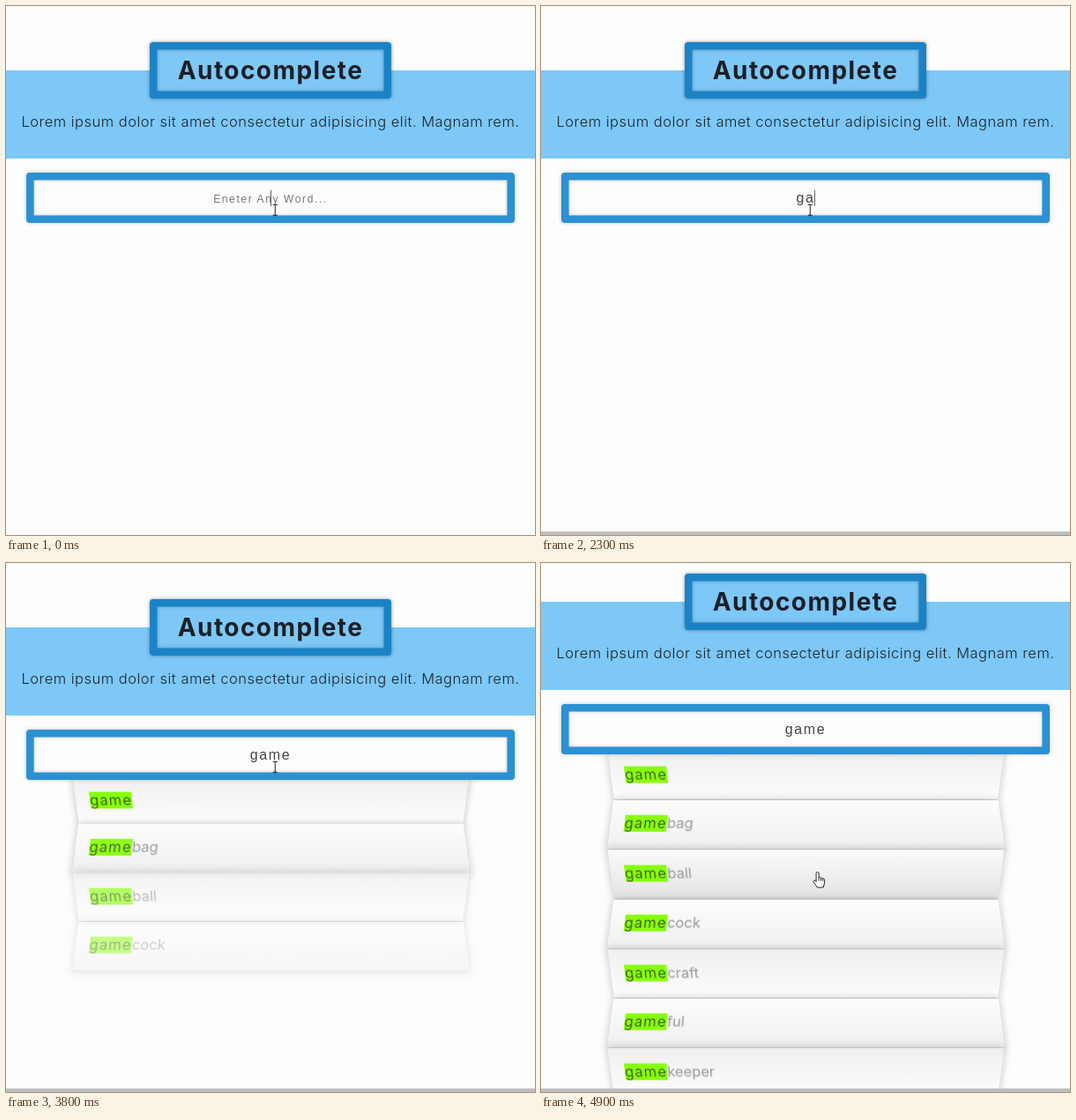
Animation of 600x600 px, one loop 5000 ms. Source, as an HTML page:

```html
<!DOCTYPE html>
<html lang="en">
<head>
<meta charset="utf-8">
<title>Autocomplete</title>
<style>
  * { box-sizing: border-box; }
  html, body { margin: 0; width: 100%; height: 100%; overflow: hidden; background: #fefdfe; }
  #stage { position: absolute; left: 0; top: 0; width: 600px; height: 600px; overflow: hidden; font: 16.5px Inter, Montserrat, sans-serif; }
  #page, #page > div { position: absolute; }
  #page { left: 0; top: 0; width: 600px; height: 1000px; }
  .band { left: 0; top: 73px; width: 600px; height: 99.5px; background: #7dc8f7; }
  .title {
    left: 163px; top: 41px; width: 274px; height: 64px; border: 8px solid #1b83c5; border-radius: 4px;
    background: #7dc8f7; box-shadow: 0 0 4px rgba(0,0,0,.4), inset 0 0 0 .5px #1b83c5, inset 0 0 5px rgba(0,0,0,.3);
    color: #1d1f27; font-size: 28px; font-weight: 700; letter-spacing: 1.45px; line-height: 48px; text-align: center; white-space: nowrap;
  }
  .intro { left: -20px; top: 121px; width: 640px; line-height: 20px; text-align: center; font-weight: 300; letter-spacing: .48px; color: #1c242c; white-space: nowrap; }
  .field {
    left: 23px; top: 188.5px; width: 554px; height: 57.5px; border: 8px solid #2a91d3; border-radius: 4px; z-index: 2;
    background: #fefdfe; box-shadow: 0 0 4px rgba(0,0,0,.25), inset 0 0 0 .6px #2a91d3, inset 0 0 5px rgba(0,0,0,.25);
  }
  #value {
    left: 31px; top: 197px; width: 538px; z-index: 3; text-align: center; color: #444; line-height: 41px;
    font-family: "Liberation Sans", Arial, sans-serif; font-size: 16px; letter-spacing: 1.62px;
  }
  #value.empty { color: #777; font-size: 12px; line-height: 44px; }
  #page > #caret { top: 209px; width: 1px; height: 18px; background: #666; z-index: 4; }
  #list { left: 78.5px; top: 240px; width: 443px; }
  .row {
    height: 56.2px; padding: 17px 16px 0; line-height: 19px; white-space: nowrap; color: #999;
    border-bottom: 1px solid #d4d3d5; box-shadow: 0 0 9px rgba(0,0,0,.25);
    background: linear-gradient(#efeef0, #fefdfe);
  }
  .row:nth-child(even) { background: linear-gradient(#fefdfe, #efeef0); }
  .row.hover { background: linear-gradient(#faf9fa, #e5e3e6); }
  mark { display: inline-block; background: #88ff0a; color: #2b3320; font-weight: 300; letter-spacing: 1.3px; }
  #bar { position: absolute; left: 0; top: 596px; width: 600px; height: 4px; background: #bfbfbf; }
  #mouse { position: absolute; left: 0; top: 0; }
</style>
</head>
<body>
<div id="stage">
  <div id="page">
    <div class="band"></div>
    <div class="title">Autocomplete</div>
    <div class="intro">Lorem ipsum dolor sit amet consectetur adipisicing elit. Magnam rem.</div>
    <div id="list"></div>
    <div class="field"></div>
    <div id="value"></div>
    <div id="caret"></div>
  </div>
  <div id="bar"></div>
  <svg id="mouse" width="600" height="600">
    <g id="pointer">
      <path id="beam" d="M-2.5-6H-.8L0-5.4.8-6H2.5M0-5.4V5.4M-2.5 6H-.8L0 5.4.8 6H2.5" fill="none" stroke="#333" stroke-width="1.1"/>
      <g id="hand" stroke="#222" stroke-width="1" stroke-linejoin="round">
        <path fill="#fff" d="M-2.5 2V-7.5a1.5 1.5 0 0 1 3 0V-2.5a1.4 1.4 0 0 1 2.4.5 1.4 1.4 0 0 1 2.2.7 1.2 1.2 0 0 1 1.9 1.2V4L5.5 8.5H-1.2L-5.6 2.2a1.4 1.4 0 0 1 2-1.6z"/>
        <path fill="none" d="M.5-2.5V1M2.9-2V1M5.1-1.3V1.2"/>
      </g>
    </g>
  </svg>
</div>
<script>
const LOOP = 5000, STEP = 100, PITCH = 56.2;
const $ = id => document.getElementById(id);
const clamp = (v, a, b) => Math.min(b, Math.max(a, v));

// [time, text, width up to the caret]
const typing = [[0, '', 0], [2100, 'g', 10], [2300, 'ga', 20], [3200, 'gam', 35], [3300, 'game', 45.5]];
const lists = [
  { from: 2600, to: 3200, key: 2, words: ['Ga', 'ga', 'gab', 'gabbard', 'gabber', 'gabble'] },
  { from: 3500, to: LOOP, key: 4, words: ['game', 'gamebag', 'gameball', 'gamecock', 'gamecraft', 'gameful', 'gamekeeper', 'gamekeeping'] }
];
const path = [[4300, 305.3, 231.4], [4400, 311.4, 238.5], [4500, 314, 275], [4600, 315, 330], [4700, 314.6, 359.5]];
const fade = [.5, .65, .95, 1];
const tilt = [
  'perspective(87px) rotateX(-3deg) translateY(2.6px)',
  'perspective(87px) rotateX(3deg) translateY(1.7px) scale(1.001)'
];

function mouseAt(t) {
  let i = 0;
  while (i < path.length - 2 && t > path[i + 1][0]) i++;
  const [t0, x0, y0] = path[i], [t1, x1, y1] = path[i + 1];
  const k = clamp((t - t0) / (t1 - t0), 0, 1);
  return [x0 + (x1 - x0) * k, y0 + (y1 - y0) * k];
}

function showList(list) {
  $('list').innerHTML = list ? list.words.map(w =>
    `<div class="row"><mark>${w.slice(0, list.key)}</mark>${w.slice(list.key)}</div>`).join('') : '';
}

function placeRows(age, hover) {
  [...$('list').children].forEach((row, i) => {
    const n = age / STEP - i;
    const lift = i ? Math.max(0, 4 - n) : 0;
    row.style.visibility = n < 0 ? 'hidden' : 'visible';
    row.style.opacity = fade[clamp(n, 0, 3)];
    row.style.transform = `translateY(${-lift}px) ${tilt[i % 2]}`;
    row.classList.toggle('hover', i === hover);
  });
}

let current;

function draw(t) {
  const [since, text, width] = typing.filter(k => k[0] <= t).pop();
  $('value').textContent = text || 'Eneter Any Word...';
  $('value').className = text ? '' : 'empty';
  $('caret').style.left = 299.5 + width / 2 + 'px';
  $('caret').style.visibility = (t - since) % 1000 < 500 ? 'visible' : 'hidden';

  const scroll = 29 * clamp((t - 4700) / 200, 0, 1) ** 2;
  $('page').style.transform = `translateY(${-scroll}px)`;

  const [x, y] = mouseAt(t);
  const over = y + scroll > 247;
  $('pointer').setAttribute('transform', `translate(${x} ${y})`);
  $('beam').style.display = over ? 'none' : '';
  $('hand').style.display = over ? '' : 'none';

  const list = lists.find(l => t >= l.from && t < l.to);
  if (list !== current) showList(current = list);
  if (list) placeRows(t - list.from, over ? Math.floor((y - 7 + scroll - 242) / PITCH) : -1);
  $('bar').style.display = t >= 2200 ? '' : 'none';
}

const start = performance.now();
function tick() {
  const t = (performance.now() - start) % LOOP;
  draw(Math.floor(t / STEP) * STEP);
  requestAnimationFrame(tick);
}
tick();
</script>
</body>
</html>
```
